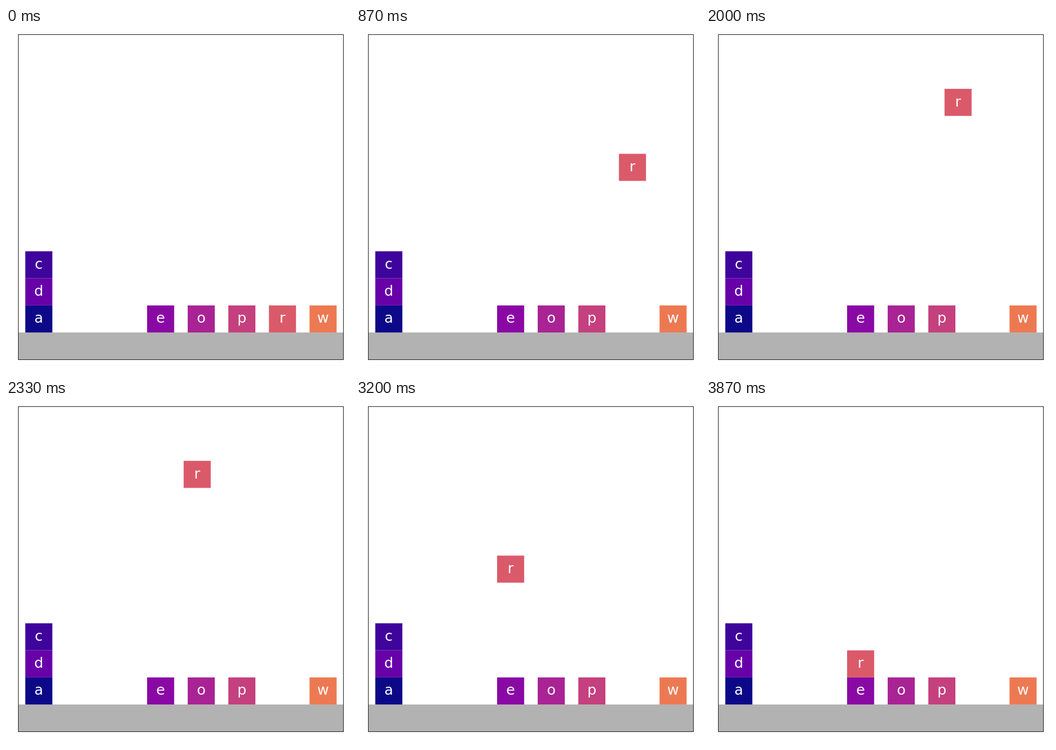
These frames come from a looping animation (600 by 600 pixels, 4.87 s). An HTML page with a canvas:

```html
<!DOCTYPE html>
<html>
<head>
<meta charset="utf-8">
<style>
html, body { margin: 0; width: 100%; height: 100%; overflow: hidden; background: #fff; }
canvas { display: block; }
</style>
</head>
<body>
<canvas id="stage" width="600" height="600"></canvas>
<script>
const ctx = document.getElementById('stage').getContext('2d');
const LOOP = 4870;
const UNIT = 47.22, LEFT = 21.8, FLOOR = 531.1;

// letter, colour, column, height above the floor
const blocks = [
  ['a', '#0d0887', 0, 0],
  ['c', '#3f049c', 0, 2],
  ['d', '#6700a8', 0, 1],
  ['e', '#8a09a5', 3, 0],
  ['o', '#a92395', 4, 0],
  ['p', '#c5407e', 5, 0],
  ['w', '#ed7953', 7, 0]
];

function drawBlock([letter, colour, col, row]) {
  const x = LEFT + UNIT * (0.25 + 1.5 * col);
  const y = FLOOR - UNIT * (row + 1);
  ctx.fillStyle = colour;
  ctx.fillRect(x, y, UNIT, UNIT);
  ctx.fillStyle = '#fff';
  ctx.fillText(letter, x + UNIT / 2, y + UNIT / 2 + 6.9);
}

// Lift, pause, slide left, lower: position at 15 steps per second
function carried(t) {
  const step = Math.floor((Math.floor(t / 10) + 0.5) * 3 / 20);
  const lift = step < 1 ? 0 : Math.min(step + 1, 20) / 20;
  const slide = step < 30 ? 0 : Math.min(step - 28, 10) / 10;
  const lower = Math.min(Math.max(step - 38, 0), 20) / 20;
  return ['r', '#da5a6a', 6 - 3 * slide, 8 * lift - 7 * lower];
}

function draw(t) {
  ctx.fillStyle = '#fff';
  ctx.fillRect(0, 0, 600, 600);
  ctx.fillStyle = '#b2b2b2';
  ctx.fillRect(LEFT, FLOOR, 12 * UNIT, UNIT);
  ctx.font = '25px "DejaVu Sans", sans-serif';
  ctx.textAlign = 'center';
  blocks.forEach(drawBlock);
  drawBlock(carried(t));
  ctx.strokeStyle = '#222';
  ctx.lineWidth = 1;
  ctx.strokeRect(21.5, 11.5, 567, 567);
}

const start = performance.now();
function tick() {
  draw((performance.now() - start) % LOOP);
  requestAnimationFrame(tick);
}
tick();
</script>
</body>
</html>
```
